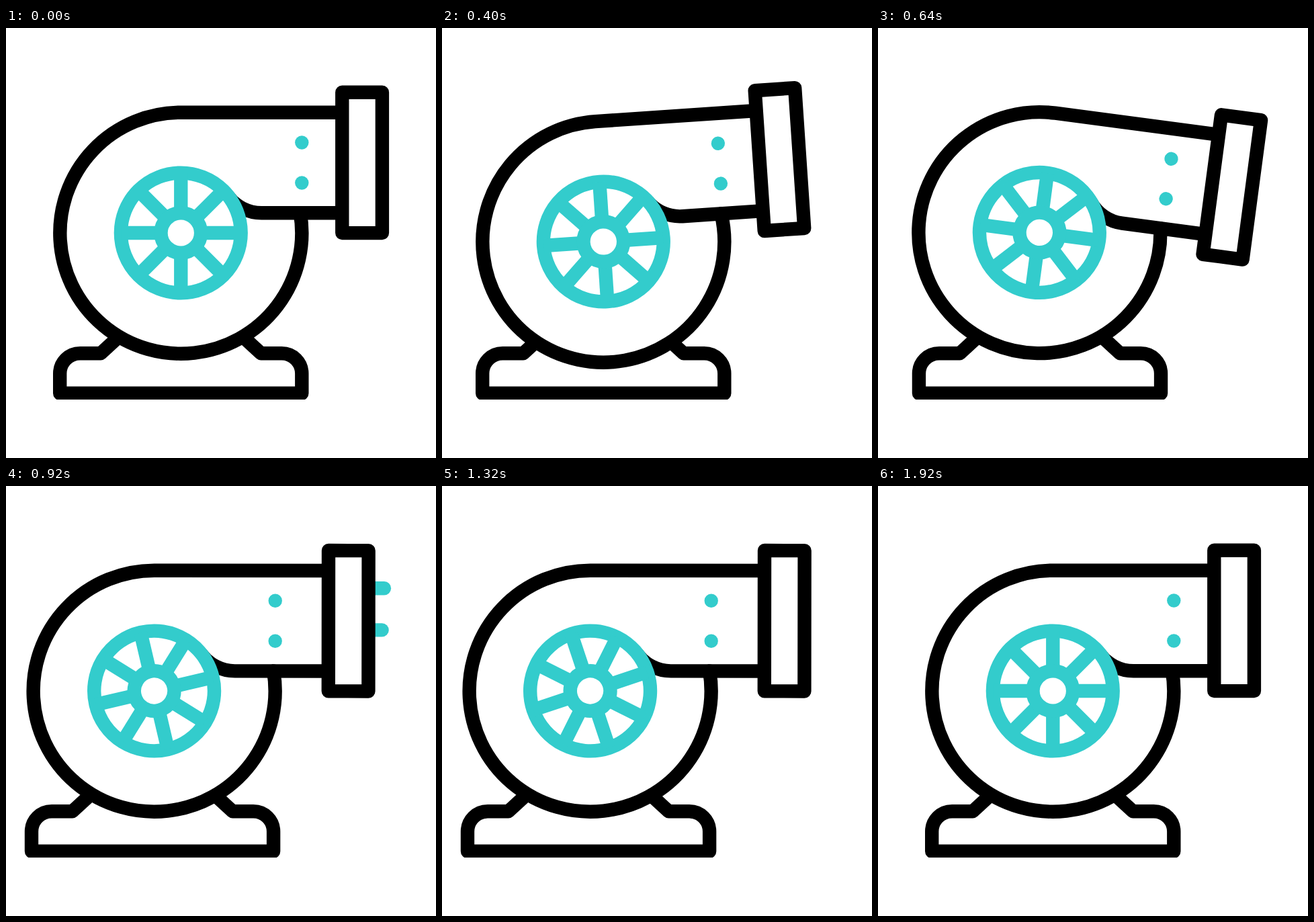
Write an HTML page that moves like this. It is 640 px wide and 640 px high and loops after 2000 ms.

```html
<!DOCTYPE html>
<html lang="en">
<head>
<meta charset="utf-8">
<title>Turbo blower</title>
<style>
  html, body { margin: 0; width: 100%; height: 100%; overflow: hidden; background: #fff; }
  svg { display: block; width: 100%; height: 100%; }
  .ink, .air { stroke-width: 20.4; stroke-linecap: round; stroke-linejoin: round; }
  .ink { fill: #fff; stroke: #000; }
  .open { fill: none; }
  .air { fill: #fff; stroke: #3cc; }
  .spoke { stroke-linecap: butt; }
  .dot { fill: #3cc; }
</style>
</head>
<body>
<svg viewBox="0 0 640 640">
  <clipPath id="floor"><rect x="-100" width="840" height="553"/></clipPath>
  <g clip-path="url(#floor)">
    <path id="base" class="ink" d="M175 453L141 484.2H110.2A30 30 0 0 0 80.2 514.2V543.8H440.3V514.2A30 30 0 0 0 410.3 484.2H379.5L345.5 453"/>
  </g>
  <g id="puffs"></g>
  <g id="head">
    <path id="shell" class="ink"/>
    <path id="lip" class="ink open"/>
    <circle class="dot" cx="180" cy="-134.5" r="10.2"/>
    <circle class="dot" cx="180" cy="-74.5" r="10.2"/>
    <g id="wheel">
      <circle class="air" r="89.4"/>
      <g id="spokes"></g>
      <circle class="air" r="29.8"/>
    </g>
    <rect id="flange" class="ink" x="240" y="-209.2" width="59.6" height="209.3"/>
  </g>
</svg>
<script>
const LOOP = 2000, STEP = 40;
const $ = id => document.getElementById(id);

function add(parent, tag, attrs) {
  const el = document.createElementNS('http://www.w3.org/2000/svg', tag);
  for (const key in attrs) el.setAttribute(key, attrs[key]);
  return parent.appendChild(el);
}

function ease(t, start, end) {
  const p = Math.min(1, Math.max(0, (t - start) / (end - start)));
  return p * p * (3 - 2 * p);
}

// Eased value through [time, value] keys
function track(t, keys) {
  let value = keys[0][1];
  for (let i = 1; i < keys.length; i++) {
    const [start, from] = keys[i - 1], [end, to] = keys[i];
    value += (to - from) * ease(t, start, end);
  }
  return value;
}

const sway = (left, settled) =>
  [[80, 0], [335, -34], [530, 20], [settled, left], [1640, left], [1920, 0]];
const motion = {
  base: sway(-42.2, 717),
  x: sway(-39.7, 709),
  y: [[80, 0], [280, 0], [400, 13], [530, -0.7], [900, 0]],
  tilt: [[80, 0], [270, -10], [596, 7.55], [640, 7.55], [880, 0.06], [1640, 0.06], [1920, 0]],
  reach: [[560, 0], [792, 19.2], [1640, 19.2], [1920, 0]],
  spin: [[646, 0], [1566, 360]]
};

for (let a = 0; a < 360; a += 45)
  add($('spokes'), 'path', { class: 'air spoke', d: 'M30 0H89', transform: `rotate(${a})` });

const puffs = [{ y: 152.2, delay: 0 }, { y: 214.4, delay: 8 }].map(p =>
  ({ ...p, el: add($('puffs'), 'path', { class: 'air' }) }));

function draw(t) {
  const now = {};
  for (const name in motion) now[name] = track(t, motion[name]);
  const end = 240 + now.reach;

  $('base').setAttribute('transform', `translate(${now.base} 0)`);
  $('head').setAttribute('transform',
    `translate(${260.3 + now.x} ${305 + now.y}) rotate(${now.tilt})`);
  $('shell').setAttribute('d', `M${end} -179.3H0A180 179.5 0 1 0 177.5 -29.8`);
  $('lip').setAttribute('d', `M${end} -29.8H120A62 62 0 0 1 70 -55`);
  $('flange').setAttribute('transform', `translate(${now.reach} 0)`);
  $('wheel').setAttribute('transform', `rotate(${now.spin})`);

  for (const { el, y, delay } of puffs) {
    const p = ease(t, 780 + delay, 1260 + delay);
    const tip = 529 + 165 * p;
    el.setAttribute('d', `M${tip - 50} ${y}H${tip}`);
    el.setAttribute('visibility', p > 0 && p < 1 ? 'visible' : 'hidden');
  }
}

const begin = performance.now();
function tick() {
  const t = (performance.now() - begin) % LOOP;
  draw(Math.floor(t / STEP) * STEP);
  requestAnimationFrame(tick);
}
tick();
</script>
</body>
</html>
```
